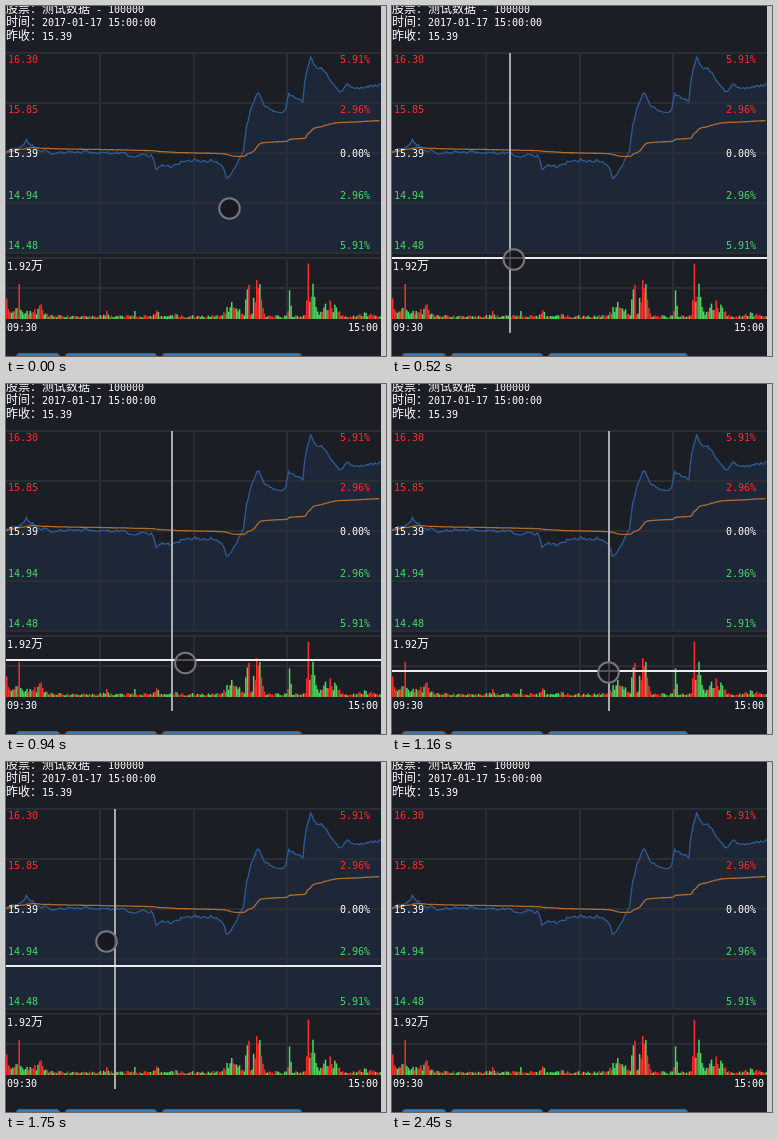
Write an HTML page with a canvas that moves like this. It is 380x350 px and loops after 3 s.

```html
<!DOCTYPE html>
<html lang="zh">
<head>
<meta charset="utf-8">
<title>Intraday chart</title>
<style>
html, body { margin: 0; width: 100%; height: 100%; overflow: hidden; background: #1b1e24; }
canvas { display: block; }
</style>
</head>
<body>
<canvas id="stage" width="380" height="350"></canvas>
<script>
const RED = '#ff2b2b', GREEN = '#4bd863', WHITE = '#fff', GRID = '#2a2d33';
const W = 375, TOP = 47, ROW = 50, BOTTOM = TOP + 4 * ROW, VOL_TOP = 252, VOL_BASE = 313;
const MINUTES = 240;

// Turning points of the price: [x, y]
const turns = [
  [0,148],[6,144],[16,142],[20,134],[33,143],[44,147],[90,146],[146,150],[150,164],[156,157],
  [165,162],[176,155],[205,154],[218,162],[221,174],[230,162],[238,143],[240,121],[244,106],
  [252,85],[259,102],[272,106],[280,103],[282,88],[297,95],[299,73],[305,50],[310,62],
  [317,63],[334,87],[340,78],[350,83],[374,79]
];
// Bursts of trading: [x, spread, height]
const bursts = [
  [0,1,32],[12,1,52],[10,20,13],[33,9,15],[100,4,8],[128,3,10],[150,4,9],[168,10,6],
  [226,9,19],[241,2,52],[251,5,50],[283,2,37],[302,2,61],[307,3,48],[323,10,20],[360,15,7]
];
// Finger position: [tick, x, y]
const swipe = [
  [1,223,202],[3,190,211],[4,144,236],[6,110,250],[11,129,255],[12,128,267],[19,217,287],
  [20,216,288],[22,147,262],[23,128,253],[29,72,105],[30,66,90],[31,62,84]
];

function at(points, p) {
  const i = points.findIndex(q => q[0] > p);
  if (i < 0) return points[points.length - 1].slice(1);
  const a = points[i - 1] || points[0], b = points[i];
  const k = Math.max(0, (p - a[0]) / (b[0] - a[0]));
  return a.slice(1).map((v, j) => v + (b[j + 1] - v) * k);
}

let seed = 11;
function random() {
  seed = (seed * 16807) % 2147483647;
  return seed / 2147483647;
}

// Price with jitter, volume, and the volume-weighted average price
function makeMinutes() {
  const minutes = [];
  let jitter = 0, traded = 0, value = 0;
  for (let i = 0; i < MINUTES; i++) {
    const x = i * W / MINUTES;
    jitter = jitter * 0.5 + (random() - 0.5) * 3;
    const price = at(turns, x)[0] + jitter;
    const peak = Math.max(4, ...bursts.map(([mid, spread, h]) => h * Math.exp(-(((x - mid) / spread) ** 2))));
    const volume = peak * (0.35 + 0.65 * random());
    traded += volume;
    value += volume * price;
    minutes.push({ x, price, volume, average: value / traded, color: random() < 0.55 ? RED : GREEN });
  }
  return minutes;
}

function rect(c, color, x, y, w, h) {
  c.fillStyle = color;
  c.fillRect(x, y, w, h);
}

function trace(c, points, color) {
  c.beginPath();
  points.forEach(p => c.lineTo(...p));
  c.strokeStyle = color;
  c.lineWidth = 1.3;
  c.stroke();
}

// Half-width characters advance 6 px, full-width ones 12 px
function text(c, str, x, middle, color = WHITE) {
  c.fillStyle = color;
  for (const ch of str) {
    const wide = ch > '\u2fff';
    c.font = wide ? '12px "Noto Sans CJK SC", "Noto Sans CJK", sans-serif'
                  : '10px "DejaVu Sans Mono", monospace';
    c.fillText(ch, x, middle + 4);
    x += wide ? 12 : 6;
  }
}

function drawChart(c) {
  const minutes = makeMinutes();
  const line = minutes.map(m => [m.x, m.price]);
  line.push([W, line[MINUTES - 1][1]]);

  rect(c, '#1b1e24', 0, 0, 380, 350);
  c.beginPath();
  [[0, BOTTOM], ...line, [W, BOTTOM]].forEach(p => c.lineTo(...p));
  c.fillStyle = '#1e2737';
  c.fill();

  for (let i = 0; i <= 4; i++) rect(c, GRID, 0, TOP + i * ROW - 1, W, 2);
  for (let i = 0; i < 2; i++) rect(c, GRID, 0, VOL_TOP + i * 30 - 1, W, 2);
  for (let i = 1; i < 4; i++) {
    const x = Math.round(i * W / 4) - 1;
    rect(c, GRID, x, TOP, 2, BOTTOM - TOP);
    rect(c, GRID, x, VOL_TOP, 2, VOL_BASE - VOL_TOP);
  }

  trace(c, line, '#2d5b98');
  trace(c, minutes.map(m => [m.x, m.average]), '#ae6d30');
  for (const m of minutes) rect(c, m.color, m.x, VOL_BASE - m.volume, 1.5, m.volume);

  text(c, '股票：测试数据 - 100000', 0, 3);
  text(c, '时间：2017-01-17 15:00:00', 0, 16);
  text(c, '昨收：15.39', 0, 30);
  [['16.30', '5.91%', 53, RED], ['15.85', '2.96%', 103, RED], ['15.39', '0.00%', 147, WHITE],
   ['14.94', '2.96%', 189, GREEN], ['14.48', '5.91%', 239, GREEN]].forEach(([left, right, y, color]) => {
    text(c, left, 2, y, color);
    text(c, right, 334, y, color);
  });
  text(c, '1.92万', 1, 260);
  text(c, '09:30', 1, 321);
  text(c, '15:00', 342, 321);

  for (const [x, w] of [[10, 44], [59, 92], [156, 140]]) {
    c.beginPath();
    c.roundRect(x + 0.5, 347.5, w - 1, 20, 3);
    c.fillStyle = '#337ab7';
    c.fill();
    c.strokeStyle = '#2e6da4';
    c.lineWidth = 1;
    c.stroke();
  }
  rect(c, '#cbcbcb', W, 0, 5, 350);
}

// Screen updates come in bursts with a pause between them
function tickAt(t) {
  if (t < 1150) return Math.floor(t / 57.5);
  return t < 1470 ? 20 : 21 + Math.floor((t - 1470) / 55);
}

const ctx = document.getElementById('stage').getContext('2d');
const chart = document.createElement('canvas');
chart.width = 380;
chart.height = 350;
drawChart(chart.getContext('2d'));

const LIFT = 35;

function frame(now) {
  const tick = tickAt(now % 3000);
  ctx.drawImage(chart, 0, 0);

  // The crosshair trails the finger by one tick
  if (tick >= 1 && tick < LIFT) {
    const [x, y] = at(swipe, tick - 1).map(Math.round);
    rect(ctx, '#a9abad', x - 1, TOP, 2, 280);
    rect(ctx, '#ececec', 0, y - 1, W, 2);
  }

  const [x, y] = at(swipe, tick);
  ctx.globalAlpha = tick < LIFT ? 1 : Math.max(0, (LIFT + 3 - tick) / 4);
  ctx.beginPath();
  ctx.arc(x + 0.5, y + 0.5, 10.3, 0, Math.PI * 2);
  ctx.fillStyle = 'rgba(18, 20, 25, 0.7)';
  ctx.fill();
  ctx.strokeStyle = '#75777a';
  ctx.lineWidth = 2;
  ctx.stroke();
  ctx.globalAlpha = 1;

  requestAnimationFrame(frame);
}
requestAnimationFrame(frame);
</script>
</body>
</html>
```
